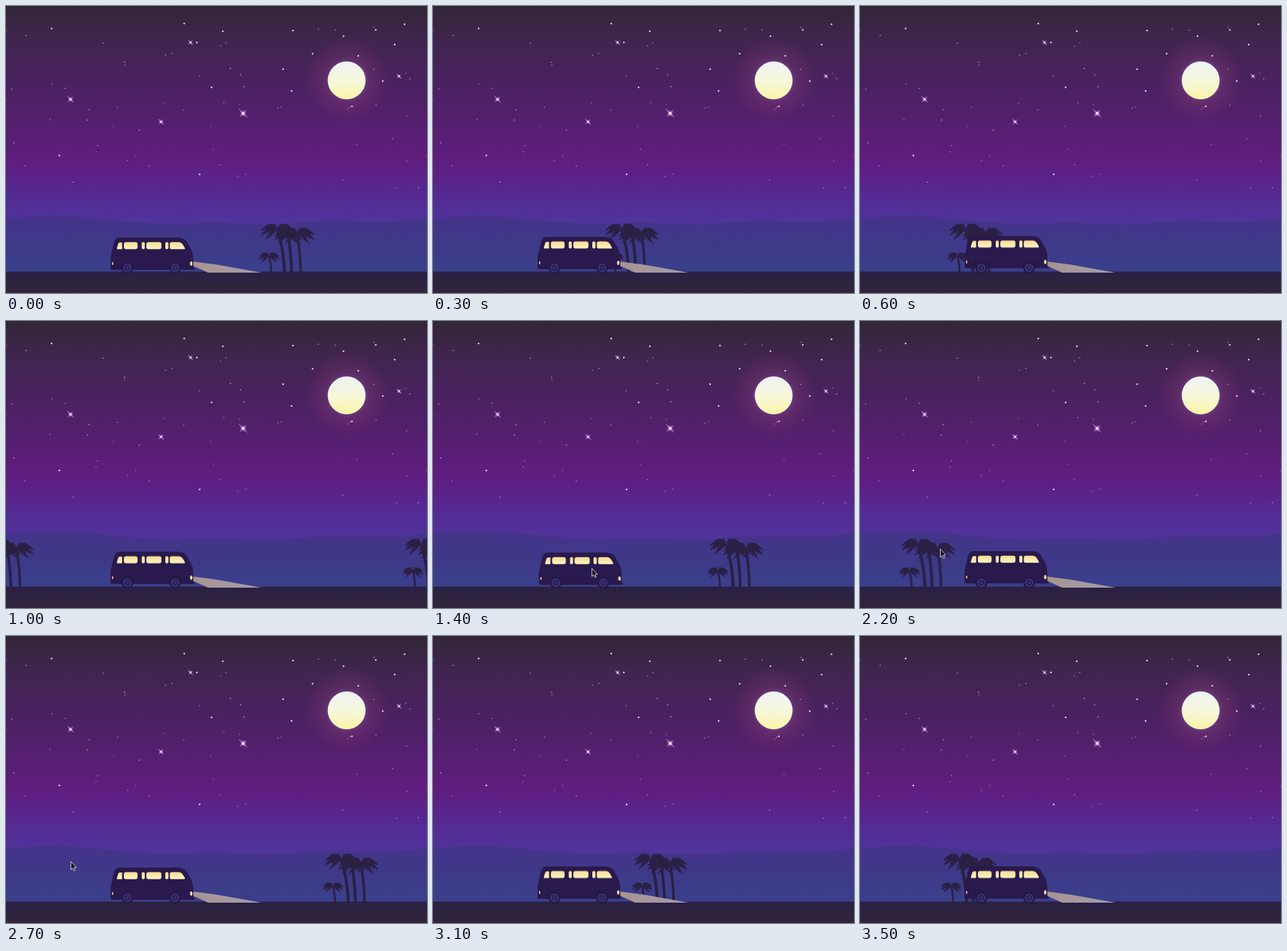
An HTML page for the animation above (3.6 s loop, 600 by 409 pixels).

```html
<!DOCTYPE html>
<html lang="en">
<head>
<meta charset="utf-8">
<title>Night drive</title>
<style>
  html, body { margin: 0; width: 100%; height: 100%; overflow: hidden; background: #2d2240; }
  svg { display: block; width: 600px; height: 409px; }

  #palms, #body, #van, #beam, #cursor { animation: 3600ms steps(1) infinite; }
  #palms { animation-name: drive; }
  #body { animation-name: bounce; animation-timing-function: ease-in-out; }
  #van { animation-name: brake; }
  #beam { animation-name: lights; }
  #cursor { animation-name: point; }

  /* The scenery advances every 100 ms */
  @keyframes drive {
    0% { transform: translateX(0); animation-timing-function: steps(6); }
    16.6667% { transform: translateX(-236px); animation-timing-function: steps(4); }
    27.7778% { transform: translateX(-400px); animation-timing-function: steps(4); }
    38.8889% { transform: translateX(-574px); animation-timing-function: steps(13); }
    75% { transform: translateX(-1119px); animation-timing-function: steps(9); }
    100% { transform: translateX(-1497px); }
  }
  @keyframes bounce {
    0%, 37.5%, 75% { transform: translateY(0); }
    18.75%, 56.25%, 93.75% { transform: translateY(-2.4px); }
    100% { transform: translateY(-1.2px); }
  }
  @keyframes brake {
    0%, 47.2222%, 100% { transform: translateX(0); }
    36.1111% { transform: translateX(1.8px); }
  }
  @keyframes lights {
    0%, 47.2222%, 100% { opacity: 1; }
    36.1111% { opacity: 0; }
  }
  @keyframes point {
    0% { transform: translate(240px, 396px); opacity: 0; }
    33.3333% { transform: translate(240px, 396px); opacity: 1; animation-timing-function: steps(2); }
    38.8889% { transform: translate(226px, 352px); opacity: 1; animation-timing-function: steps(8); }
    61.1111% { transform: translate(114px, 324.5px); opacity: 1; animation-timing-function: steps(5); }
    75% { transform: translate(92px, 321px); opacity: 1; }
    80.5556%, 100% { transform: translate(92px, 321px); opacity: 0; }
  }
</style>
</head>
<body>
<svg viewBox="0 0 600 409">
  <defs>
    <linearGradient id="sky" gradientUnits="userSpaceOnUse" x1="0" y1="0" x2="0" y2="310">
      <stop offset="0" stop-color="#322637"/>
      <stop offset=".16" stop-color="#40254f"/>
      <stop offset=".35" stop-color="#4a2160"/>
      <stop offset=".52" stop-color="#541f6e"/>
      <stop offset=".7" stop-color="#601d7e"/>
      <stop offset=".76" stop-color="#5d2085"/>
      <stop offset=".87" stop-color="#542a93"/>
      <stop offset="1" stop-color="#4f349c"/>
    </linearGradient>
    <linearGradient id="hill" gradientUnits="userSpaceOnUse" x1="0" y1="299" x2="0" y2="379">
      <stop offset="0" stop-color="#45338a"/>
      <stop offset=".5" stop-color="#3e3988"/>
      <stop offset="1" stop-color="#3a408c"/>
    </linearGradient>
    <linearGradient id="ground" x1="0" y1="0" x2="0" y2="1">
      <stop offset="0" stop-color="#2b2044"/>
      <stop offset="1" stop-color="#31253b"/>
    </linearGradient>
    <linearGradient id="disc" x1="0" y1="0" x2="0" y2="1">
      <stop offset="0" stop-color="#eef3f3"/>
      <stop offset=".5" stop-color="#f6f7dc"/>
      <stop offset="1" stop-color="#faf5a6"/>
    </linearGradient>
    <radialGradient id="glow">
      <stop offset=".42" stop-color="#7a4a9c" stop-opacity=".6"/>
      <stop offset=".52" stop-color="#7c3a72" stop-opacity=".4"/>
      <stop offset=".8" stop-color="#74306a" stop-opacity=".22"/>
      <stop offset="1" stop-color="#6a246c" stop-opacity="0"/>
    </radialGradient>
    <linearGradient id="glass" gradientUnits="userSpaceOnUse" x1="0" y1="336" x2="0" y2="347">
      <stop offset="0" stop-color="#f6dc92"/>
      <stop offset="1" stop-color="#fcf5c4"/>
    </linearGradient>
    <linearGradient id="ray">
      <stop offset="0" stop-color="#a8948f"/>
      <stop offset="1" stop-color="#a39caf"/>
    </linearGradient>
  </defs>

  <rect width="600" height="409" fill="url(#sky)"/>
  <circle cx="486" cy="106" r="62" fill="url(#glow)"/>
  <circle cx="485.5" cy="106" r="27" fill="url(#disc)"/>
  <g id="stars" fill="#f0dcf6"></g>
  <path fill="url(#hill)" d="M0 303C30 300 60 298 95 300C135 303 170 308 215 310C255 312 270 308 310 309C345 310 365 313 395 311C425 308 440 306 480 306C525 308 565 308 600 302V380H0Z"/>

  <g id="palms" fill="#2a2044" stroke="#2a2044"></g>
  <rect y="378.5" width="600" height="31" fill="url(#ground)"/>

  <path id="beam" fill="url(#ray)" d="M265 364L300 368.5L364 380H288L265 369.5Z"/>
  <g id="van">
    <g id="body">
      <path fill="#29194c" d="M161 330H243Q253 330 257 335L264 347Q267 353 267 360V374Q267 376 264 376H152Q149 376 149 373V358L154 337Q156 330 161 330Z"/>
      <path d="M150 360H267" stroke="#33215c" stroke-width=".8"/>
      <g fill="url(#glass)">
        <path d="M161.5 337H165.5V346.5H159Q157.5 346.5 158 345L160 338.5Z"/>
        <rect x="168" y="336.5" width="19.5" height="10" rx="3"/>
        <rect x="193.5" y="336.5" width="4.3" height="10" rx="1.8"/>
        <rect x="200" y="336.5" width="21.5" height="10" rx="3"/>
        <rect x="227" y="336.5" width="4.5" height="10" rx="1.8"/>
        <path d="M236 336.5H246Q250 336.5 252 340L255 345Q255.5 346.5 253.5 346.5H235.5Q233.5 346.5 233.5 344.5V339Q233.5 336.5 236 336.5Z"/>
      </g>
      <ellipse cx="264" cy="367" rx="1.7" ry="3" fill="#fbe9ac"/>
      <ellipse cx="152" cy="367" rx="1.1" ry="2.2" fill="#eca77e"/>
      <rect x="263" y="373" width="6" height="3" rx="1.5" fill="#29194c"/>
    </g>
    <g id="wheels"></g>
  </g>

  <path id="cursor" d="M.5 .5V12L3 9.700L4.700 13.700L6.600 12.900L4.900 9H8.300Z" fill="#100e18" stroke="#dcd8e8" stroke-width=".9"/>
</svg>

<script>
  const fill = (id, parts) => document.getElementById(id).innerHTML = parts.join('');

  let seed = 11;
  const random = () => (seed = seed * 16807 % 2147483647) / 2147483647;

  const star = (x, y, r, alpha) => `<circle cx="${x}" cy="${y}" r="${r}" opacity="${alpha}"/>`;

  function sparkle([x, y, size]) {
    const arm = (angle, length, alpha) =>
      `<ellipse transform="rotate(${angle})" rx="${length}" ry=".6" opacity="${alpha}"/>`;
    return `<g transform="translate(${x} ${y})">
      <circle r="${size * 0.5}" fill="#a65ad0" opacity=".45"/>
      ${arm(45, size, 0.6)}${arm(-45, size * 0.8, 0.4)}<circle r="${size * 0.25}"/></g>`;
  }

  const bright = [[65, 32], [254, 25], [309, 36], [409, 35], [568, 26], [481, 43], [527, 34], [554, 55],
    [272, 52], [437, 68], [502, 71], [395, 90], [293, 116], [407, 121], [537, 107], [493, 143], [276, 240], [76, 213]];
  const sparkles = [[92, 133, 7], [221, 165, 6], [338, 153, 9], [263, 52, 5], [560, 100, 5]];
  const dim = Array.from({ length: 60 }, () =>
    star(random() * 600, 30 + random() * 230, 0.9, 0.3 + random() * 0.3));
  fill('stars', [...dim, ...bright.map(([x, y]) => star(x, y, 1.3, 0.85)), ...sparkles.map(sparkle)]);

  // A drooping frond with a ragged lower edge
  function frond(cx, cy, dx, dy, rise) {
    const steps = 12, size = Math.hypot(dx, dy) / 3.6;
    const top = [], low = [];
    for (let i = 0; i <= steps; i++) {
      const t = i / steps;
      const x = cx + dx * t, y = cy + dy * t - 4 * rise * t * (1 - t);
      const drop = size * Math.sin(Math.PI * t) * (i % 2 ? 1.1 : 0.65);
      top.push([x, y - 0.8]);
      low.unshift([x - Math.sign(dx) * drop * 0.15, y + drop]);
    }
    return 'M' + top.concat(low).map(p => p.map(v => v.toFixed(1))).join('L') + 'Z';
  }

  function palm(x, y, base, reach, width) {
    const count = 10;
    const crown = Array.from({ length: count }, (_, i) => {
      const angle = (i / (count - 1) - 0.5) * 4.7;
      const dx = Math.sin(angle), dy = -0.55 * Math.cos(angle) + 0.2;
      return frond(x, y, dx * reach, dy * reach, (0.05 + 0.25 * Math.abs(dx)) * reach);
    });
    const bend = `${x + (base - x) * 0.85} ${y + (378 - y) * 0.45}`;
    return `<path d="M${x} ${y}Q${bend} ${base} 380" fill="none" stroke-width="${width}"/>
      <path d="${crown.join('')}" stroke="none"/>`;
  }

  const grove = palm(387, 319, 397, 24, 4.2) + palm(402, 327, 407, 20, 4) +
    palm(415, 325, 420, 25, 3.6) + palm(375, 357, 378, 15, 2.8);
  fill('palms', [0, 1, 2, 3].map(i => `<g transform="translate(${i * 605})">${grove}</g>`));

  fill('wheels', [173, 241].map(x => `<g transform="translate(${x} 373)">
    <circle r="8.5" fill="#261848"/>
    <circle r="5.2" fill="#2b2158" stroke="#413f88" stroke-width="1.3"/>
    <circle r="2" fill="#372f70"/></g>`));
</script>
</body>
</html>
```
